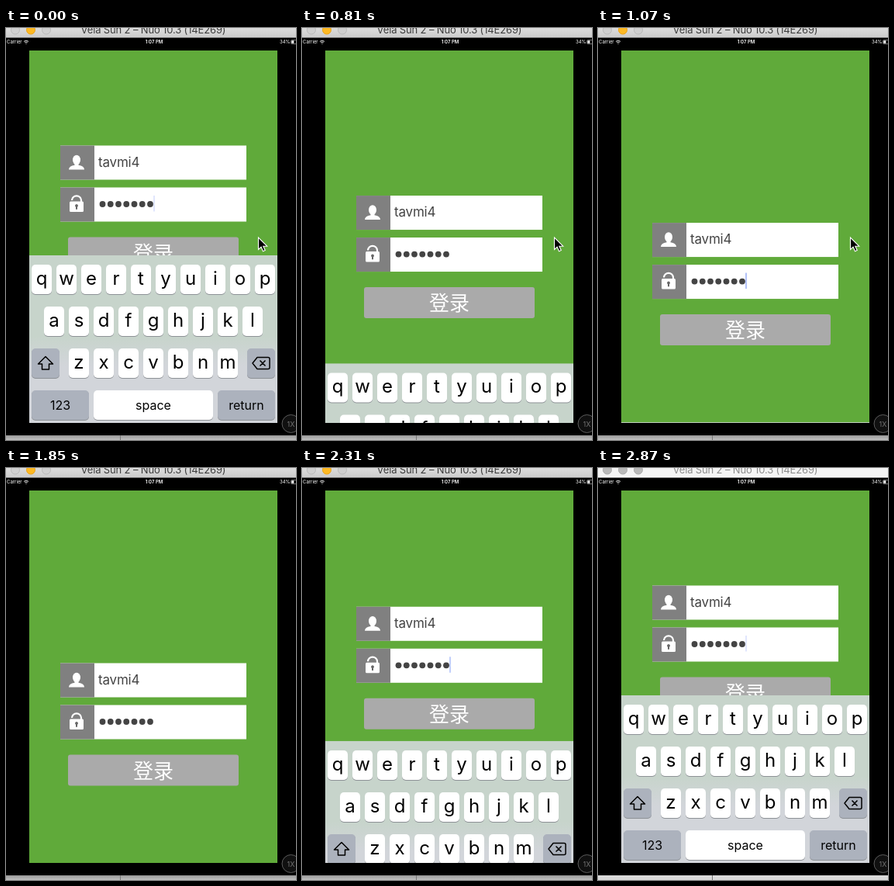
An HTML page that plays this animation: 374 px wide and 531 px high, repeating every 2.97 s.

```html
<!DOCTYPE html>
<html lang="zh">
<head>
<meta charset="utf-8">
<title>Login form</title>
<style>
  html, body { margin: 0; width: 100%; height: 100%; overflow: hidden; background: #000; }
  svg { display: block; width: 374px; height: 531px; }
  text { font-family: Inter, Roboto, sans-serif; }
  .status { font-size: 6px; fill: #fff; }
  .title { font-size: 13px; letter-spacing: -.15px; fill: #3c3c3c; text-anchor: middle; }
  .letter { font-size: 24px; text-anchor: middle; }
  .label { font-size: 16px; text-anchor: middle; }
  .field { font-size: 17px; letter-spacing: -.2px; fill: #444; }
  .login { font: 26px "Noto Sans CJK SC", "Noto Sans CJK", sans-serif; fill: #fff; text-anchor: middle; }
  .lamp { fill: #cfcfcf; stroke: #b9b9b9; }
  .amber { fill: #fdb924; stroke: #e9a31c; }
  .inactive .title { fill: #8c8c8c; }
  .inactive .lamp { fill: #b9b9b9; stroke: #acacac; }
  .inactive .bar { fill: #f4f4f4; }
  .inactive .desk { fill: #dadada; }
</style>
</head>
<body>
<svg id="stage" viewBox="0 0 374 531">
  <defs>
    <linearGradient id="barFill" x2="0" y2="1">
      <stop stop-color="#dcdcdc"/><stop offset="1" stop-color="#cbcbcb"/>
    </linearGradient>
    <linearGradient id="deskFill" x2="0" y2="1">
      <stop stop-color="#989898"/><stop offset="1" stop-color="#c0c0c0"/>
    </linearGradient>
    <linearGradient id="boardFill" x2="0" y2="1">
      <stop stop-color="#c7d4cb"/><stop offset=".48" stop-color="#c7d4cb"/>
      <stop offset=".66" stop-color="#d2d5da"/>
    </linearGradient>
    <clipPath id="screen"><rect x="30" y="29" width="320" height="480"/></clipPath>
  </defs>

  <rect width="374" height="531"/>
  <rect class="bar" width="374" height="12.5" fill="url(#barFill)"/>
  <circle class="lamp" cx="12" cy="2.5" r="5.5"/>
  <circle class="lamp amber" cx="32" cy="2.5" r="5.5"/>
  <circle class="lamp" cx="52" cy="2.5" r="5.5"/>
  <text class="title" x="190" y="7">Vela Sun 2 – Nuo 10.3 (14E269)</text>

  <text class="status" x="1" y="20">Carrier</text>
  <g fill="none" stroke="#fff" stroke-width=".9">
    <path d="M23 17.4q3-2.6 6 0M24.3 18.8q1.7-1.5 3.4 0"/>
    <path d="M25.5 20.2h1"/>
  </g>
  <text class="status" x="191" y="20" text-anchor="middle" font-weight="600">1:07 PM</text>
  <text class="status" x="353" y="20">34%</text>
  <rect x="367.5" y="15.5" width="9" height="5" rx="1" fill="none" stroke="#aaa" stroke-width=".7"/>
  <rect x="368.3" y="16.3" width="3" height="3.4" fill="#fff"/>

  <g clip-path="url(#screen)">
    <rect x="30" y="29" width="320" height="480" fill="#60aa3a"/>
    <g id="form">
      <rect x="70" width="240" height="44" fill="#fff"/>
      <rect x="70" width="44" height="44" fill="#808080"/>
      <g fill="#fff">
        <ellipse cx="91" cy="18.5" rx="5" ry="6.3"/>
        <path d="M88.5 22h5v3.2q7.5 1.3 7.5 5.8h-20q0-4.500 7.500-5.800z"/>
      </g>
      <text class="field" x="119" y="27">tavmi4</text>

      <g transform="translate(0 54)">
        <rect x="70" width="240" height="44" fill="#fff"/>
        <rect x="70" width="44" height="44" fill="#808080"/>
        <rect x="82" y="18" width="18" height="13.500" rx="1.500" fill="#fff"/>
        <path d="M85 16.500a6 5.700 0 0 1 12 0v2" fill="none" stroke="#fff" stroke-width="2.200"/>
        <path d="M91 21.500a2 2 0 0 1 1 3.700v3h-2v-3a2 2 0 0 1 1-3.700z" fill="#666"/>
        <g id="dots" fill="#444"></g>
        <rect id="caret" x="190.200" y="10.500" width="1.600" height="20.500" fill="#426bf2"/>
      </g>

      <rect x="80" y="118" width="220" height="40" rx="3" fill="#aaa"/>
      <text class="login" x="190" y="148">登录</text>
    </g>
    <g id="board"><rect x="30" width="320" height="216" fill="url(#boardFill)"/></g>
  </g>

  <circle cx="367.500" cy="510" r="11.500" fill="#101010" stroke="#5c5c5c"/>
  <text x="367.500" y="513.500" font-size="9" fill="#757575" text-anchor="middle">1X</text>
  <rect class="desk" y="525" width="374" height="6" fill="url(#deskFill)"/>
  <path d="M147.500 525v6" stroke="#777"/>

  <path id="pointer" d="M0 0v15.500l3.600-3.300 2.400 5.500 2.700-1.200-2.400-5.300h4.900z" stroke="#fff" stroke-width="1.100"/>
</svg>
<script>
const LOOP = 2970;
const $ = id => document.getElementById(id);

function add(parent, tag, attrs, text = '') {
  const node = document.createElementNS(parent.namespaceURI, tag);
  for (const name in attrs) node.setAttribute(name, attrs[name]);
  node.textContent = text;
  parent.append(node);
  return node;
}

function addKey(x, y, width, fill = '#fff') {
  for (const [dy, color] of [[1, '#8d9196'], [0, fill]])
    add($('board'), 'rect', { x, y: y + dy, width, height: 38, rx: 5, fill: color });
}

function addTextKey(x, y, width, text, fill) {
  addKey(x, y, width, fill);
  const kind = text.length > 1 ? 'label' : 'letter';
  add($('board'), 'text', { class: kind, x: x + width / 2, y: y + (kind === 'label' ? 25 : 26) }, text);
}

function addIconKey(x, y, path) {
  addKey(x, y, 36, GREY);
  add($('board'), 'path', {
    d: path, transform: `translate(${x + 18} ${y + 19})`,
    fill: 'none', stroke: '#000', 'stroke-width': 1.5, 'stroke-linejoin': 'round'
  });
}

const GREY = '#acb2bd';
[['qwertyuiop', 33, 12], ['asdfghjkl', 49, 66], ['zxcvbnm', 81, 120]].forEach(([letters, x, y]) =>
  [...letters].forEach((letter, i) => addTextKey(x + 32 * i, y, 26, letter)));
addIconKey(33, 120, 'M0-8.500L9.500 1H4.500V8h-9V1h-5z');
addIconKey(311, 120, 'M-11 0l6-7.500H9q2 0 2 2v11q0 2-2 2H-5zM-1.500-3.500l7 7m0-7l-7 7');
addTextKey(33, 174, 74, '123', GREY);
addTextKey(113, 174, 154, 'space');
addTextKey(273, 174, 74, 'return', GREY);

for (let i = 0; i < 7; i++) add($('dots'), 'circle', { cx: 124.5 + 10.25 * i, cy: 21.5, r: 3.9 });

// Start time and caret opacity of each held picture.
const steps = [
  [0, .2], [60, .1], [120, 0], [530, .5], [590, 1],
  [810, 0], [870, 0], [930, 0], [1000, .2], [1070, .5], [1130, .85], [1210, 1], [1290, 1], [1390, 1],
  [1850, 0], [2190, 0], [2310, .4], [2430, 1], [2570, 1], [2660, 1], [2870, .2]
];

// Share of the keyboard that has slid out of view.
function hiddenShare(t) {
  const decay = start => Math.exp(-.017 * (t - start));
  if (t < 810 || t >= 2660) return 0;
  if (t < 1210) return 1 - decay(749);
  if (t < 2190) return 1;
  return t < 2310 ? .92 : decay(2233.6);
}

function pointerPlace(t) {
  if (t < 1210) return [325.5, 270];
  if (t < 1290) return [326.5, 272];
  return t < 1390 ? [327.5, 274] : [327.5, 277];
}

function draw(now) {
  const time = now % LOOP;
  const [t, caret] = steps.findLast(step => step[0] <= time);
  const hidden = hiddenShare(t);
  $('form').setAttribute('transform', `translate(0 ${151.5 + 100 * hidden})`);
  $('board').setAttribute('transform', `translate(0 ${293 + 216 * hidden})`);
  $('caret').setAttribute('opacity', caret);
  $('pointer').setAttribute('transform', `translate(${pointerPlace(t)})`);
  $('pointer').setAttribute('visibility', t < 1850 ? 'visible' : 'hidden');
  $('stage').classList.toggle('inactive', t >= 2870);
}

const start = performance.now();
function tick() {
  draw(performance.now() - start);
  requestAnimationFrame(tick);
}
tick();
</script>
</body>
</html>
```
